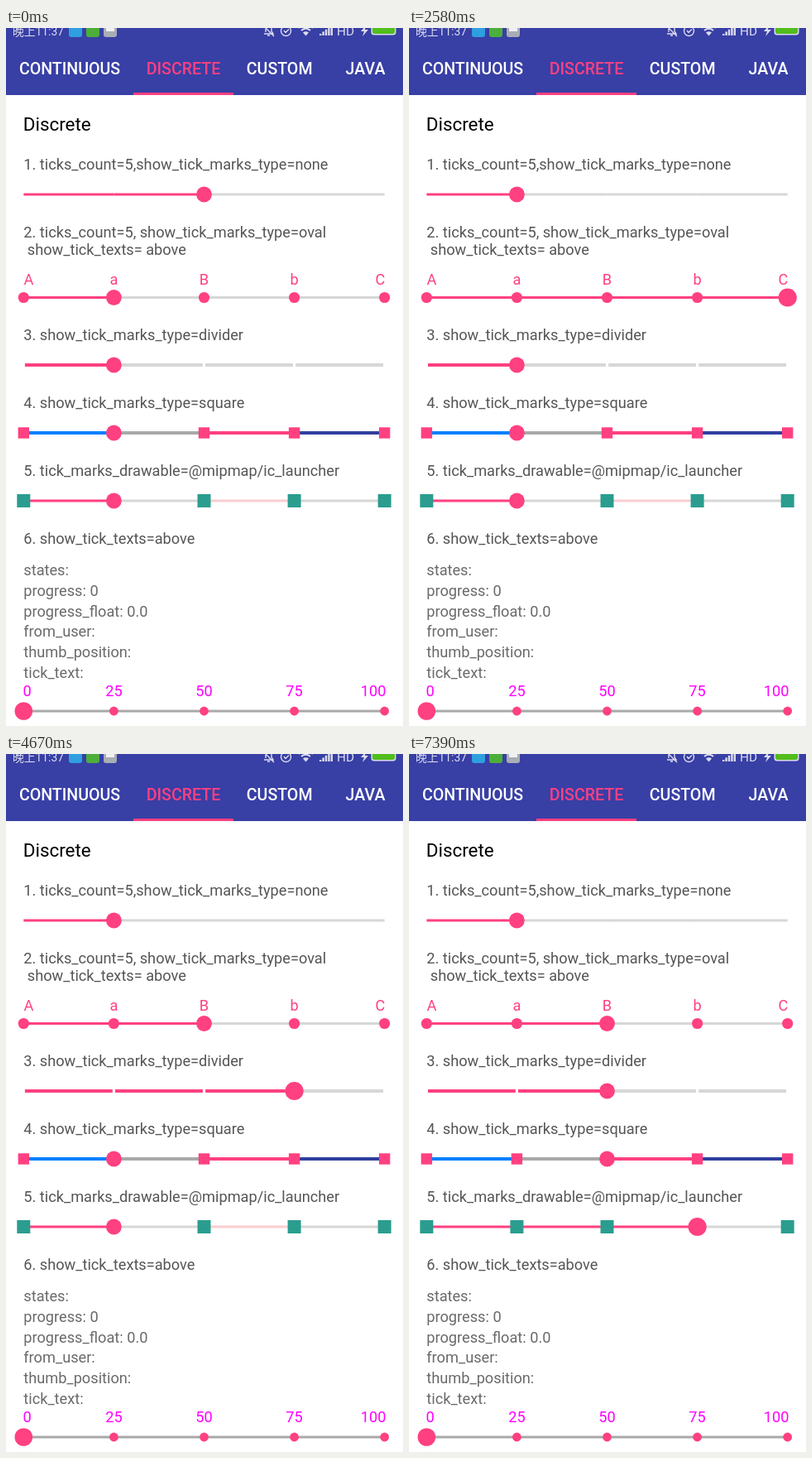
Animation of 480 by 843 pixels, one loop 8000 ms. Source, as an HTML page:

```html
<!DOCTYPE html>
<html lang="en">
<head>
<meta charset="utf-8">
<title>Discrete sliders</title>
<style>
  html, body { margin: 0; width: 100%; height: 100%; overflow: hidden; background: #fff; }
  svg { display: block; width: 100%; height: 100%; }
  text { font-family: Roboto, "Noto Sans CJK SC", "Noto Sans CJK", sans-serif; white-space: pre; }
</style>
</head>
<body>
<svg id="stage" viewBox="0 0 480 843"></svg>
<script>
const LOOP = 8000;
const PINK = '#ff4081', GREY = '#d6d7d6', BAR = '#383fa5', LIGHT = '#dcdcee';
const stage = document.getElementById('stage');
const tickX = i => 21.3 + 109.1 * i;

function add(tag, attrs, parent = stage) {
  const el = document.createElementNS('http://www.w3.org/2000/svg', tag);
  for (const k in attrs) el.setAttribute(k, attrs[k]);
  parent.appendChild(el);
  return el;
}
const rect = (x, y, w, h, fill, rx = 0) => add('rect', { x, y, width: w, height: h, fill, rx });
const circle = (cx, cy, r, fill) => add('circle', { cx, cy, r, fill });
const stroke = (d, w = 1.4) => add('path', { d, fill: 'none', stroke: LIGHT, 'stroke-width': w });
function label(str, x, y, size, fill, anchor = 'start', weight = 400) {
  add('text', { x, y, fill, 'font-size': size, 'text-anchor': anchor, 'font-weight': weight }).textContent = str;
}

function drawStatusBar() {
  label('晚上11:37', 8, 9, 13.8, LIGHT);
  rect(76, -5, 16, 16, '#2f9fe0', 3);
  rect(97, -5, 16, 16, '#4caf3a', 3);
  rect(118, -5, 16, 16, '#a9adb4', 3);
  rect(121, 0, 10, 4, '#f0f0f4');
  // muted bell, alarm, wifi
  stroke('M312 7H323L321 4V-2M314 5V-2M316 9H319M311 -3L324 10');
  stroke('M332.5 3.5a6 6 0 1 0 12 0a6 6 0 1 0 -12 0M336 3L338 5.5L342 1.5');
  stroke('M354 0Q362.500 -7 371 0M357 3Q362.500 -1.500 368 3', 2);
  add('path', { d: 'M359 5.500Q362.500 3 366 5.500L362.500 9.500Z', fill: LIGHT });
  for (let i = 0; i < 5; i++) rect(379 + i * 3.4, 7 - i * 2.6, 2.4, 2 + i * 2.6, LIGHT);
  label('HD', 400, 9, 15.4, LIGHT);
  add('path', { d: 'M435 -3L429 4H433L431 10L438 2H434Z', fill: LIGHT });
  rect(441.5, -5, 30, 13.5, LIGHT, 3.5);
  rect(443, -4, 27, 11, '#52bd1c', 2.5);
}

function drawTabs() {
  [['CONTINUOUS', 77], ['DISCRETE', 214.5], ['CUSTOM', 330.7], ['JAVA', 434.5]].forEach(([name, x], i) =>
    label(name, x, 56, 19.6, i === 1 ? PINK : '#fff', 'middle', 500));
  rect(154, 78, 121, 3, PINK);
}

function drawText() {
  label('Discrete', 20.8, 124.4, 22.4, '#000');
  [
    ['1. ticks_count=5,show_tick_marks_type=none', 171],
    ['2. ticks_count=5, show_tick_marks_type=oval', 253],
    [' show_tick_texts= above', 274.3],
    ['3. show_tick_marks_type=divider', 377.3],
    ['4. show_tick_marks_type=square', 459.2],
    ['5. tick_marks_drawable=@mipmap/ic_launcher', 541],
    ['6. show_tick_texts=above', 623]
  ].forEach(([str, y]) => label(str, 21.3, y, 18.2, '#555'));
  ['states:', 'progress: 0', 'progress_float: 0.0', 'from_user:', 'thumb_position:', 'tick_text:']
    .forEach((str, i) => label(str, 21.3, 661 + i * 24.8, 18.2, '#6a6a6a'));
  tickLabels(['A', 'a', 'B', 'b', 'C'], 309.8, PINK, 21.5, 458.3);
  tickLabels(['0', '25', '50', '75', '100'], 807.4, '#f0f', 20.5, 459.5);
}

function tickLabels(names, y, fill, left, right) {
  names.forEach((name, i) => {
    const x = i === 0 ? left : i === 4 ? right : tickX(i);
    label(name, x, y, 18.2, fill, i === 0 ? 'start' : i === 4 ? 'end' : 'middle');
  });
}

// moves: [time, tick] while the thumb is held; up: time of release
const sliders = [
  { y: 201, h: 3, start: 2, up: 2120,
    moves: [[350, 2], [430, 1], [1140, 2], [1350, 3], [1640, 2], [1810, 1]] },
  { y: 325.5, h: 3, start: 1, up: 3530, mark: 'oval',
    moves: [[2180, 3], [2580, 4], [2680, 3], [2775, 2], [2870, 1], [2965, 0], [3060, 1], [3240, 2]] },
  { y: 407, h: 4, start: 1, up: 5270, mark: 'divider',
    moves: [[3620, 2], [3810, 3], [4200, 2], [4300, 1], [4590, 2], [4670, 3], [5060, 2]] },
  { y: 489, h: 4, start: 1, up: 7260, mark: 'square', colors: ['#0080ff', '#a9a9a9', PINK, '#303f9f'],
    moves: [[5390, 2], [5730, 3], [5827, 4], [5924, 3], [6021, 2], [6118, 1], [6216, 0], [6313, 1],
      [6410, 3], [6880, 2], [6975, 1], [7070, 2]] },
  { y: 571, h: 3, start: 1, up: LOOP, mark: 'icon', rest: [GREY, GREY, '#f9cdd1', GREY],
    moves: [[7390, 3]] }
];

function drawMark(kind, x, y) {
  if (kind === 'oval') return circle(x, y, 6.6, PINK);
  if (kind === 'square') return rect(x - 6.7, y - 6.7, 13.4, 13.4, PINK);
  if (kind === 'icon') return rect(x - 8, y - 8, 16, 16, '#2a9d8f');
}

function buildSlider(s) {
  const inset = s.mark === 'divider' ? 1.6 : 0;
  s.parts = [0, 1, 2, 3].map(i =>
    rect(tickX(i) + inset, s.y - s.h / 2, 109.1 - 2 * inset, s.h, GREY));
  s.marks = [0, 1, 2, 3, 4].map(i => drawMark(s.mark, tickX(i), s.y));
  s.thumb = circle(0, s.y, 9.4, PINK);
}

function showSlider(s, t) {
  let pos = s.start, held = false;
  for (const [at, tick] of s.moves) {
    if (t < at) break;
    pos = tick;
    held = t < s.up;
  }
  s.parts.forEach((part, i) => {
    const rest = s.rest ? s.rest[i] : GREY;
    part.setAttribute('fill', s.colors ? s.colors[i] : i < pos ? PINK : rest);
  });
  s.marks.forEach((mark, i) => mark && mark.setAttribute('visibility', i === pos ? 'hidden' : 'visible'));
  s.thumb.setAttribute('cx', tickX(pos));
  s.thumb.setAttribute('r', held ? 11.1 : 9.4);
}

function drawLastSlider() {
  rect(tickX(0), 823.5, 436.4, 3, '#a9a9a9');
  for (let i = 0; i < 5; i++) circle(tickX(i), 825, i ? 5.4 : 10.8, PINK);
}

rect(0, 0, 480, 81, BAR);
drawStatusBar();
drawTabs();
drawText();
sliders.forEach(buildSlider);
drawLastSlider();

const begin = performance.now();
function frame() {
  const t = (performance.now() - begin) % LOOP;
  sliders.forEach(s => showSlider(s, t));
  requestAnimationFrame(frame);
}
frame();
</script>
</body>
</html>
```
